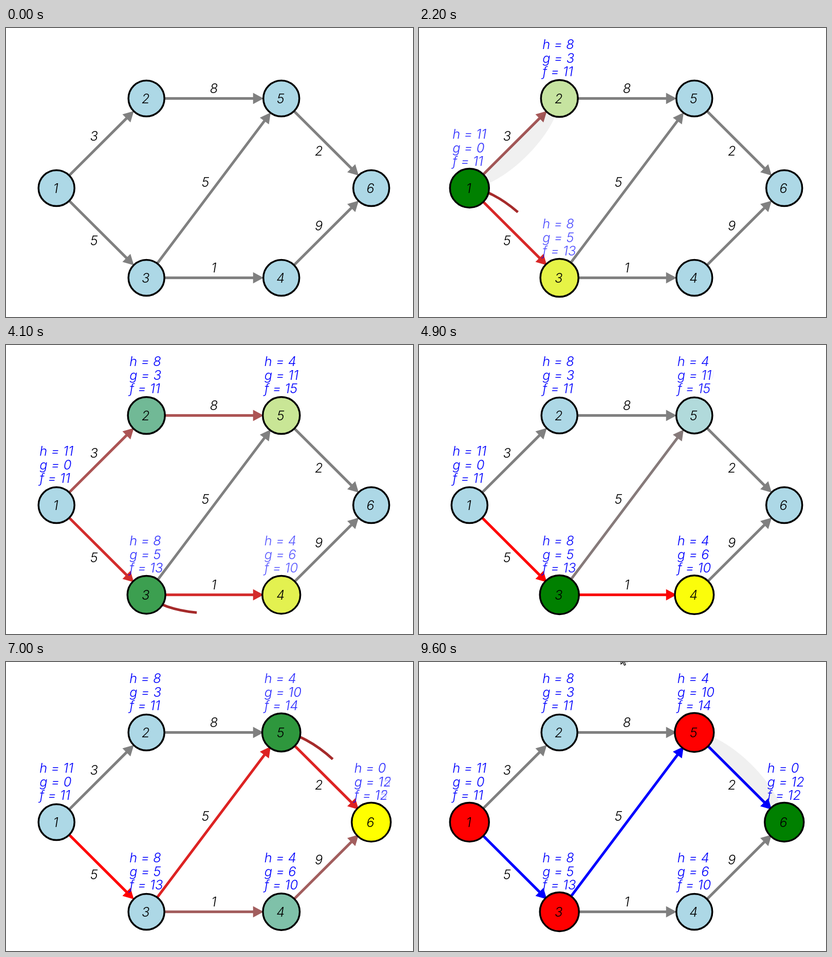
Animation, 792 px wide and 564 px high, one loop 9.8 s. Source, as an HTML page with a canvas:

```html
<!DOCTYPE html>
<html lang="en">
<head>
<meta charset="utf-8">
<title>Shortest path search</title>
<style>
html, body { margin: 0; width: 100%; height: 100%; overflow: hidden; background: #fff; }
canvas { display: block; }
</style>
</head>
<body>
<canvas id="stage" width="792" height="564"></canvas>
<script>
const ctx = document.getElementById('stage').getContext('2d');
const LOOP = 9800, BEGIN = 370, FIRST = 1040, GAP = 957, FINISH = 7680;
const EASE_MS = 500, DRAW_MS = 500, FADE_MS = 350, HAZE = 0.15;

const BLUE = [0, 0, 255], RED = [255, 0, 0], GREEN = [0, 128, 0], YELLOW = [255, 255, 0];
const GRAY = [128, 128, 128], IDLE = [173, 216, 230];

const UNIT = 175;
const node = (col, row, h) => ({ x: 98.25 + col * UNIT, y: 312.5 + row * UNIT, h });
const nodes = {
  1: node(0, 0, 11), 2: node(1, -1, 8), 3: node(1, 1, 8),
  4: node(2.5, 1, 4), 5: node(2.5, -1, 4), 6: node(3.5, 0, 0)
};
const ids = Object.keys(nodes).map(Number);
const edges = [[1, 2, 3], [1, 3, 5], [2, 5, 8], [3, 4, 1], [3, 5, 5], [4, 6, 9], [5, 6, 2]]
  .map(([from, to, weight]) => ({ from, to, weight }));
const steps = search(1, 6);

// A* search, recorded as one step per examined edge
function search(root, goal) {
  const g = { [root]: 0 }, parent = {}, open = new Set([root]);
  const cost = id => [nodes[id].h, g[id], nodes[id].h + g[id]];
  const trace = id => id ? [...trace(parent[id]), id] : [];
  const steps = [
    { at: -LOOP, path: [], costs: {} },
    { at: BEGIN, path: [root], current: root, costs: { [root]: cost(root) } }
  ];
  while (open.size) {
    const current = [...open].reduce((a, b) => cost(b)[2] < cost(a)[2] ? b : a);
    open.delete(current);
    if (current == goal) break;
    for (const { to, weight } of edges.filter(e => e.from == current)) {
      if (g[to] <= g[current] + weight) continue;
      g[to] = g[current] + weight;
      parent[to] = current;
      open.add(to);
      steps.push({
        at: FIRST + GAP * (steps.length - 2), path: trace(to), current, curve: true,
        costs: { [current]: cost(current), [to]: cost(to) }
      });
    }
  }
  // The first curve clears late, the last one never does.
  steps[2].hazeEnd = steps[3].at + 400;
  steps[steps.length - 1].hazeEnd = LOOP;
  steps.push({ at: FINISH, path: trace(goal), current: goal, done: true, costs: {} });
  return steps;
}

const clamp = v => Math.min(1, Math.max(0, v));
const lerp = (a, b, k) => a + (b - a) * k;
const mix = (a, b, k) => a.map((v, i) => lerp(v, b[i], k));
const rgb = c => `rgb(${c.map(Math.round)})`;

// cubic-bezier(.25, .1, .25, 1)
function ease(x) {
  if (x <= 0 || x >= 1) return clamp(x);
  const bezier = (a, b, u) => 3 * a * u * (1 - u) ** 2 + 3 * b * u * u * (1 - u) + u ** 3;
  let lo = 0, hi = 1;
  for (let i = 0; i < 20; i++) {
    const mid = (lo + hi) / 2;
    if (bezier(0.25, 0.25, mid) < x) lo = mid; else hi = mid;
  }
  return bezier(0.1, 1, lo);
}

function nodeColor({ path, current, done }, id) {
  if (id == current) return GREEN;
  if (done) return path.includes(id) ? RED : IDLE;
  return id == path[path.length - 1] ? YELLOW : IDLE;
}

function edgeColor({ path, done }, { from, to }) {
  const i = path.indexOf(from);
  if (i < 0 || path[i + 1] != to) return GRAY;
  return done ? BLUE : RED;
}

// Runs draw with the x axis along the line; side is where a curve bends to.
function along(from, to, draw) {
  const a = nodes[from], b = nodes[to], dx = b.x - a.x, dy = b.y - a.y;
  ctx.save();
  ctx.translate(a.x, a.y);
  ctx.rotate(Math.atan2(dy, dx));
  draw(Math.hypot(dx, dy), dy > 0 ? -1 : 1);
  ctx.restore();
}

function drawEdge({ from, to }, color) {
  along(from, to, len => {
    const tip = len - 34.5;
    ctx.fillStyle = rgb(color);
    ctx.fillRect(0, -2.6, tip - 18, 5.2);
    ctx.beginPath();
    ctx.moveTo(tip, 0);
    ctx.lineTo(tip - 20.5, -11);
    ctx.lineTo(tip - 20.5, 11);
    ctx.fill();
  });
}

function drawWeight({ from, to, weight }) {
  const a = nodes[from], b = nodes[to], dx = b.x - a.x, dy = b.y - a.y;
  const shift = (dy > 0 ? -20.5 : 20.5) / Math.hypot(dx, dy);
  drawLabel(weight, (a.x + b.x) / 2 + dy * shift, (a.y + b.y) / 2 - dx * shift);
}

function drawCurve({ at, path, curve, hazeEnd = 0 }, t) {
  const age = t - at;
  if (age <= 0 || !curve) return;
  const alpha = clamp(1 - (age - DRAW_MS) / FADE_MS);
  const fill = age < DRAW_MS ? 0 : Math.max(alpha, t < hazeEnd ? HAZE : 0);
  along(...path.slice(-2), (len, side) => {
    const bend = side * len * 0.185;
    ctx.beginPath();
    ctx.moveTo(0, 0);
    ctx.bezierCurveTo(len * 0.19, bend, len * 0.81, bend, len, 0);
    ctx.fillStyle = `rgba(0,0,0,${0.4 * fill})`;
    ctx.fill();
    ctx.globalAlpha = alpha;
    ctx.strokeStyle = 'brown';
    ctx.lineWidth = 5;
    if (age < DRAW_MS) ctx.setLineDash([len * 1.06 * age / DRAW_MS, 2 * len]);
    ctx.stroke();
  });
}

function drawNode(id, color, radius) {
  const { x, y } = nodes[id];
  ctx.beginPath();
  ctx.arc(x, y, radius, 0, 2 * Math.PI);
  ctx.fillStyle = rgb(color);
  ctx.fill();
  ctx.strokeStyle = '#000';
  ctx.lineWidth = 3.5;
  ctx.stroke();
  drawLabel(id, x - 1.5, y - 0.5);
}

function drawLabel(text, x, y) {
  ctx.fillStyle = '#000';
  ctx.textAlign = 'center';
  ctx.fillText(text, x, y + 9.5);
}

function drawCosts(id, values, alpha) {
  const { x, y } = nodes[id];
  ctx.globalAlpha = alpha;
  ctx.fillStyle = rgb(BLUE);
  ctx.textAlign = 'left';
  values.forEach((v, i) => ctx.fillText(`${'hgf'[i]} = ${v}`, x - 33, y - 96.5 + 26.5 * i));
  ctx.globalAlpha = 1;
}

function drawCursor(x, y) {
  ctx.save();
  ctx.translate(x, y);
  ctx.beginPath();
  [[0, 0], [0, 16], [4, 12.5], [6.5, 18.5], [9, 17.5], [6.5, 11.5], [12, 11.5]].forEach(p => ctx.lineTo(...p));
  ctx.closePath();
  ctx.fillStyle = '#fff';
  ctx.fill();
  ctx.strokeStyle = '#000';
  ctx.lineWidth = 1.3;
  ctx.stroke();
  ctx.restore();
}

function render(t) {
  const index = steps.findLastIndex(s => t >= s.at);
  const now = steps[index], before = steps[Math.max(0, index - 1)];
  const k = ease((t - now.at) / EASE_MS);

  ctx.fillStyle = '#fff';
  ctx.fillRect(0, 0, 792, 564);
  ctx.font = 'italic 300 25.5px Inter, sans-serif';

  for (const edge of edges) drawEdge(edge, mix(edgeColor(before, edge), edgeColor(now, edge), k));
  for (const step of steps) drawCurve(step, t);
  edges.forEach(drawWeight);

  for (const id of ids) {
    const a = nodeColor(before, id), b = nodeColor(now, id);
    const size = color => color == IDLE ? 35 : 38;
    drawNode(id, mix(a, b, k), lerp(size(a), size(b), k));

    const old = steps.slice(0, index).findLast(s => s.costs[id])?.costs[id];
    const fresh = now.costs[id];
    if (old) drawCosts(id, old, fresh ? 1 - k : 1);
    if (fresh) drawCosts(id, fresh, k);
  }

  if (t >= 9600) drawCursor(393, -12);
  else if (t >= 9400) drawCursor(377, -16);
}

const start = performance.now();
function tick() {
  render((performance.now() - start) % LOOP);
  requestAnimationFrame(tick);
}
tick();
</script>
</body>
</html>
```
